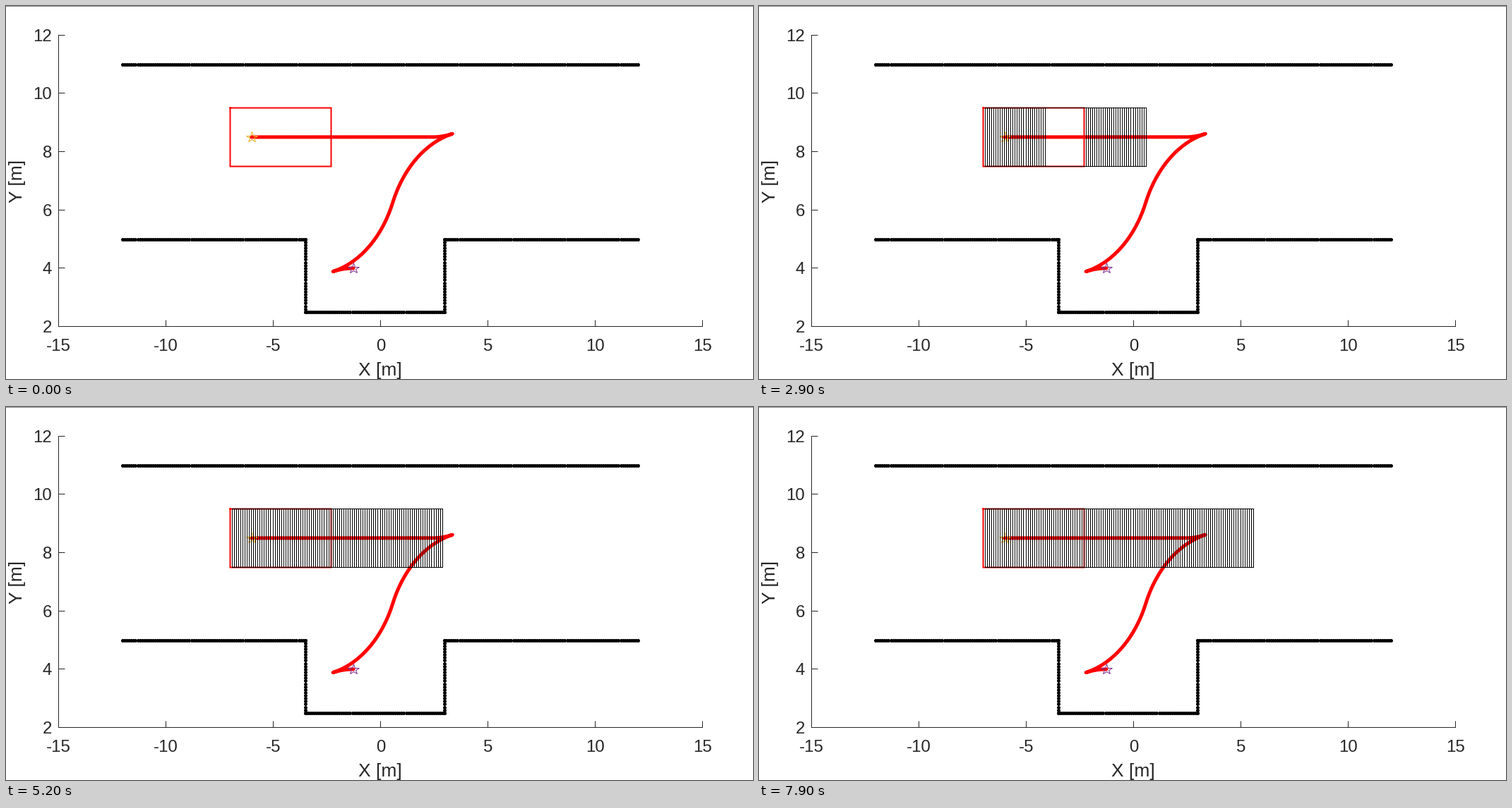
Recreate the animation shown at these times as a matplotlib script. Size 1058x529 px, loop 8000 ms.

```python
import numpy as np
import matplotlib.pyplot as plt
from matplotlib.animation import FuncAnimation
from matplotlib.collections import LineCollection

W, H, DPI = 1058, 529, 100
PT = 72 / DPI  # points per pixel
FRAMES, INTERVAL = 80, 100
STEP = 0.1
GRAY = "#262626"

fig = plt.figure(figsize=(W / DPI, H / DPI), dpi=DPI, facecolor="white")
ax = fig.add_axes([0, 0, 1, 1])
ax.set_xlim(0, W)
ax.set_ylim(H, 0)
ax.axis("off")


def px(x):
    return 530.02 + 30.4 * np.asarray(x, float)


def py(y):
    return 537.2 - 41.33 * np.asarray(y, float)


def mid(v):
    """Centre of the pixel that holds v."""
    return np.floor(v) + 0.5


def stroke(xs, ys, color, width, **kw):
    kw.setdefault("solid_capstyle", "butt")
    return ax.plot(xs, ys, color=color, lw=width * PT, snap=False, **kw)[0]


def label(x, y, s, size, **kw):
    ax.text(x, y, s, fontsize=size * PT, family="Liberation Sans",
            color=GRAY, va="baseline", **kw)


def draw_axes():
    stroke([0, W], [0.5, 0.5], "#8c8c8c", 1)
    left, right = mid(px(-15)), mid(px(15))
    top, bottom = mid(py(12)), mid(py(2))
    stroke([left, left, right], [top, bottom, bottom], GRAY, 1,
           solid_capstyle="projecting")
    for x in range(-15, 16, 5):
        tx = mid(px(x))
        stroke([tx, tx], [bottom, bottom - 9], GRAY, 1)
        label(tx, 489, str(x), 24, ha="center")
    for y in range(2, 13, 2):
        ty = mid(py(y))
        stroke([left, left + 9], [ty, ty], GRAY, 1)
        label(65, ty + 8.5, str(y), 24, ha="right")
    label(530, 524, "X [m]", 26.4, ha="center")
    label(23.5, 248, "Y [m]", 26.4, ha="center", rotation=90,
          rotation_mode="anchor")


def dots(x0, y0, x1, y1):
    n = int(round(max(abs(x1 - x0), abs(y1 - y0)) / 0.1)) + 1
    ax.scatter(px(np.linspace(x0, x1, n)), py(np.linspace(y0, y1, n)),
               s=(5 * PT) ** 2, c="black", linewidths=0, snap=False)


def draw_walls():
    dots(-12, 11, 12, 11)
    corners = [(-12, 5), (-3.5, 5), (-3.5, 2.5), (3, 2.5), (3, 5), (12, 5)]
    for a, b in zip(corners, corners[1:]):
        dots(*a, *b)


def parking_path(radius=4.05, slight=0.2368, steep=1.1717):
    """Straight run, then four arcs between headings."""
    xs, ys = [-6, 2.413], [8.5, 8.5]
    arcs = [(0, slight, 1), (slight, steep, -1), (steep, slight, 1),
            (slight, 0, -1)]
    for a, b, side in arcs:
        t = np.linspace(a, b, 40)
        x, y = xs[-1], ys[-1]
        # the inner arcs are driven backwards
        xs.extend(x + side * radius * (np.sin(t) - np.sin(a)))
        ys.extend(y - side * radius * (np.cos(t) - np.cos(a)))
    return px(xs), py(ys)


def star(x, y, color):
    ax.plot(px(x), py(y), marker="*", ms=16 * PT, mfc="none", mec=color,
            mew=PT, zorder=4)


TOP, BOTTOM = mid(py(9.5)), mid(py(7.5))
REAR, FRONT = mid(px(-7)), mid(px(-2.3))

draw_axes()
draw_walls()
stroke(*parking_path(), "red", 5, solid_capstyle="round",
       solid_joinstyle="round", zorder=3)
stroke([REAR, FRONT, FRONT, REAR, REAR], [TOP, TOP, BOTTOM, BOTTOM, TOP],
       "red", 2, solid_joinstyle="miter", solid_capstyle="projecting",
       zorder=3)
star(-6, 8.5, "#edb120")
star(-1.25, 4, "#7e2f8e")

trail = LineCollection([], colors="black", linewidths=PT, zorder=5,
                       capstyle="projecting", snap=False)
ax.add_collection(trail, autolim=False)


def update(k):
    segs = []
    if k:
        steps = STEP * np.arange(1, k + 1)
        rear, front = mid(px(-7 + steps)), mid(px(-2.3 + steps))
        for x in np.unique(np.concatenate([rear, front])):
            segs.append([(x, TOP), (x, BOTTOM)])
        for y in (TOP, BOTTOM):
            segs.append([(rear[0], y), (front[-1], y)])
    trail.set_segments(segs)
    return [trail]


anim = FuncAnimation(fig, update, frames=FRAMES, interval=INTERVAL,
                     init_func=lambda: update(0), repeat=True,
                     repeat_delay=0, blit=False)
plt.show()
```
